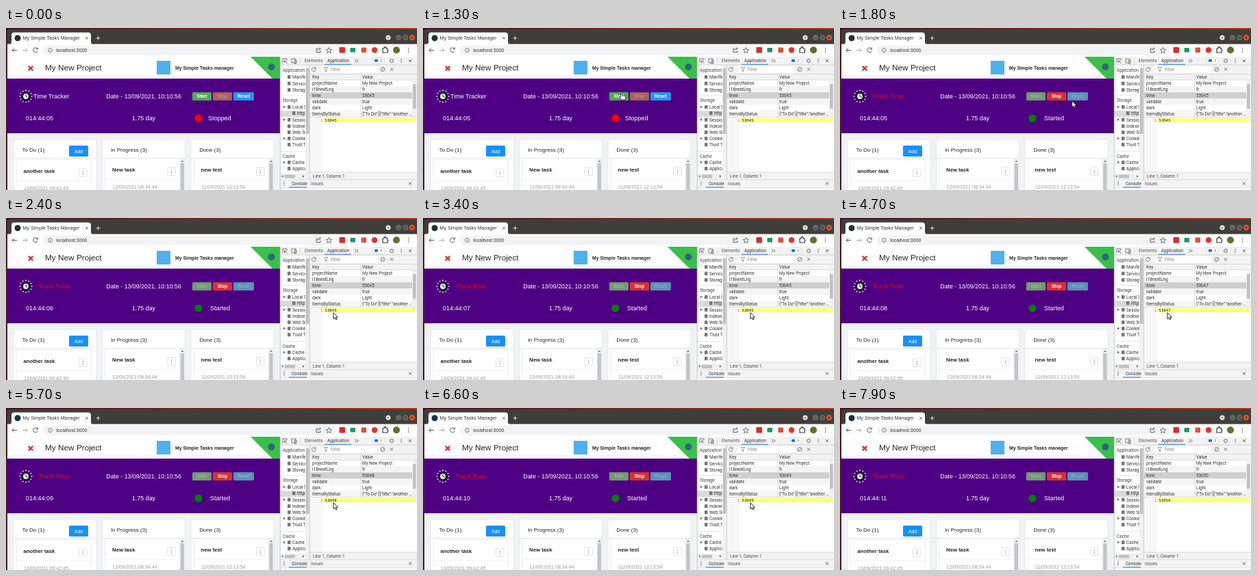
An HTML page that plays this animation: 600x237 px, repeating every 8 s.

```html
<!DOCTYPE html>
<html lang="en">
<head>
<meta charset="utf-8">
<title>Task board time tracker</title>
<style>
  html, body { margin: 0; width: 100%; height: 100%; overflow: hidden; background: #fff; }
  svg { display: block; width: 100vw; height: 100vh; }
  text { font-family: "Liberation Sans", Arial, sans-serif; white-space: pre; }
  .dev text { font-family: Roboto, "Open Sans", sans-serif; }
  .dev text.mono { font-family: "DejaVu Sans Mono", monospace; }
</style>
</head>
<body>
<svg id="stage" viewBox="0 0 600 237" preserveAspectRatio="none"></svg>
<script>
const LOOP = 8000, STEP = 100;
const STARTED = 1500, FIRST_TICK = 2300, FIRST_SAVE = 3500;
const BASE = 53045;

const rect = (x, y, w, h, fill, extra = '') =>
  `<rect x="${x}" y="${y}" width="${w}" height="${h}" fill="${fill}" ${extra}/>`;
const dot = (x, y, r, fill, extra = '') =>
  `<circle cx="${x}" cy="${y}" r="${r}" fill="${fill}" ${extra}/>`;
const line = (d, color, width = 1, extra = '') =>
  `<path d="${d}" fill="none" stroke="${color}" stroke-width="${width}" ${extra}/>`;
const text = (x, y, size, content, fill = '#222', extra = '') =>
  `<text x="${x}" y="${y}" font-size="${size}" fill="${fill}" ${extra}>${content}</text>`;
const dots = (x, y, gap, r, fill) => [-1, 0, 1].map(i => dot(x, y + i * gap, r, fill)).join('');
const cross = (x, y, r, color, width) =>
  line(`M${x - r} ${y - r}l${2 * r} ${2 * r}m0 ${-2 * r}l${-2 * r} ${2 * r}`, color, width);
const BOLD = 'font-weight="700"';
const MIDDLE = 'text-anchor="middle"';

function browser() {
  return '<linearGradient id="desk"><stop stop-color="#3a1020"/><stop offset="1" stop-color="#b03a1c"/></linearGradient>' +
    rect(0, 0, 600, 237, '#4a1a24') + rect(0, 0, 600, 3, 'url(#desk)') +
    rect(2, 1.8, 598, 22, '#403e3a', 'rx="2.5"') +
    `<path d="M5 24q3 0 3-4V10.500q0-4 4-4H120q4 0 4 4V20q0 4 3 4z" fill="#fff"/>` +
    dot(17, 14.8, 4.5, '#20303c') +
    text(24.6, 17.2, 7.1, 'My Simple Tasks Manager', '#333') +
    cross(118, 14.8, 1.8, '#555', 0.9) +
    line('M131.500 14.800h6m-3-3v6', '#ddd', 1) +
    dot(558, 14, 3.6, '#e4e4e2') + line('M556.500 13.300l1.500 1.600 1.500-1.600', '#333', 0.9) +
    dot(573, 14, 4, '#6a6963') + line('M571 15h4', '#333', 0.8) +
    dot(583.3, 14, 4, '#6a6963') + line('M581.800 12.500h3v3h-3z', '#333', 0.7) +
    dot(593, 14, 4.2, '#d9532c') + cross(593, 14, 1.5, '#42201a', 0.8) +
    rect(2, 23.5, 598, 18.5, '#fff') + '<g transform="translate(0 -1)">' +
    line('M16 33.500H9m3-3l-3 3 3 3', '#555', 1) +
    line('M24 33.500h7m-3-3l3 3-3 3', '#aaa', 1) +
    line('M46 31.500a3.400 3.400 0 1 0 .3 3M46.500 29.500v2.500h-2.500', '#555', 1) +
    rect(54, 26.5, 427, 14, '#f1f3f4', 'rx="7"') +
    dot(64.5, 33.5, 3, 'none', 'stroke="#666" stroke-width=".8"') + line('M64.500 33v2.300m0-3.800v.7', '#666', 0.7) +
    text(73.3, 36, 7, 'localhost:3000', '#333') +
    line('M455 31h-2v5.500h6V34M455 34q0-3 4-3m-1.500-1.500l1.800 1.500-1.800 1.500', '#555', 0.9) +
    line('M471.500 29.500l1.200 2.800 3 .2-2.300 2 .7 3-2.600-1.600-2.600 1.600.7-3-2.300-2 3-.2z', '#555', 0.8) +
    rect(486.5, 29, 8.5, 8.5, '#dc2b2b', 'rx="1"') +
    rect(502.5, 30, 7.5, 6.5, '#199a60', 'rx="1"') +
    rect(518.5, 29.5, 7.5, 7.5, '#e0503c', 'rx="1"') +
    dot(538, 33.3, 4.2, '#e03232') +
    line('M550 31h2v-1.500q1.500-1.500 3 0V31h2v2q2 1 0 2v2h-7z', '#333', 1.2) +
    dot(570, 33.3, 5, '#55742c') + dot(570, 34.5, 2.6, '#77653a') +
    dots(587.5, 33.3, 2.8, 0.8, '#555') + '</g>';
}

function header() {
  return rect(2, 42, 398, 32, '#fff') + line('M2 70h398', '#ececee', 1) +
    cross(36, 59, 3.2, '#dc3438', 2.4) +
    text(57, 62.2, 11.8, 'My New Project') +
    rect(220, 48, 20, 20, '#4db1ee') +
    text(247, 60.5, 6.9, 'My Simple Tasks manager', '#222', BOLD) +
    '<path d="M357 42H400V85z" fill="#38c048"/>' + dot(387.5, 57, 5, '#2d6585');
}

function button(id, x, w, label) {
  return `<g id="${id}">` + rect(x, 94, w, 12, '#fff', 'rx="1.6"') +
    text(x + w / 2, 102.3, 6.6, label, '#fff', `${BOLD} ${MIDDLE}`) + '</g>';
}

function clock() {
  const ring = Array.from({ length: 12 }, (_, i) => {
    const a = i * Math.PI / 6;
    return dot(29 + 8.6 * Math.sin(a), 100 - 8.6 * Math.cos(a), 1.05, '#e3d9b4');
  }).join('');
  return ring + dot(29, 100, 5.4, '#f4f4f4', 'stroke="#1b1c33" stroke-width="3"') +
    line('M29 97V100.300l2.500 .8', '#222', 1);
}

function tracker() {
  return rect(2, 74, 398, 80, '#4e0083') + clock() +
    text(40, 103, 9, 'Time Tracker', '#fff', 'id="heading"') +
    text(146.3, 103, 8.8, 'Date - 13/09/2021, 10:10:56', '#fff') +
    button('start', 272, 28, 'Start') +
    button('stop', 302, 28, 'Stop') +
    button('reset', 332, 30, 'Reset') +
    text(29, 135.3, 9, '', '#fff', 'id="elapsed"') +
    text(184, 135.3, 8.9, '1.75 day', '#fff') +
    dot(281, 132, 5.6, 'red', 'id="lamp"') +
    text(295, 135.3, 9, 'Stopped', '#fff', 'id="status"');
}

function column(x, title, task, date, scrolls) {
  const bar = rect(x + 113, 191, 8, 46, '#f1f1f1') + rect(x + 114.3, 198, 5.2, 39, '#c4c4c4') +
    `<path d="M${x + 115} 196l2-2.500 2 2.500z" fill="#777"/>`;
  const lift = scrolls ? -1.8 : 0;
  return rect(x, 163, 121, 80, '#fff', 'rx="2" stroke="#e2e4e8" stroke-width=".8"') +
    text(x + 12.4, 181, 8, title) +
    line(`M${x} 190.500h121`, '#e6e6e6', 1) +
    `<g transform="translate(0 ${lift})">` +
    line(`M${x + 4} 240V192.500h109V240`, '#e8e8e8', 0.8) +
    text(x + 14.6, 211.5, 7.7, task, '#222', BOLD) +
    rect(x + 95.5, 206, 11.5, 11.5, '#fff', 'rx="1.5" stroke="#d9d9d9" stroke-width=".8"') +
    dots(x + 101.2, 211.8, 2.2, 0.6, '#555') +
    line(`M${x + 4} 223.500h109`, '#eee', 0.8) +
    text(x + 15, 236.5, 7.1, date, '#999') + '</g>' + (scrolls ? bar : '');
}

function board() {
  return rect(2, 154, 398, 83, '#f0f2f5') +
    column(11, 'To Do (1)', 'another task', '13/09/2021 09:42:45', false) +
    rect(92, 172, 28, 16, '#1890ff', 'rx="1.5"') +
    text(106, 182.6, 7, 'Add', '#fff', MIDDLE) +
    column(140.5, 'In Progress (3)', 'New task', '12/09/2021 08:34:44', true) +
    column(270, 'Done (3)', 'new test', '11/09/2021 12:13:54', true);
}

function sidebar() {
  const items = [
    [64, 'Application'], [74, 'Manifest', 1], [83.5, 'Service W', 1], [93, 'Storage', 1],
    [108, 'Storage'], [118, 'Local Sto', 1], [127, 'http:', 2], [136.5, 'Session S', 1],
    [146, 'IndexedDB', 1], [155, 'Web SQL', 1], [164, 'Cookies', 1], [173, 'Trust Tok', 1],
    [189.5, 'Cache'], [199, 'Cache St', 1], [208, 'Applicati', 1]
  ];
  const folded = ['Local Sto', 'Session S', 'Cookies', 'Cache St'];
  return rect(400, 54, 43, 168, '#fff') + rect(400, 121, 40, 9, '#dadada') +
    items.map(([y, label, depth = 0]) =>
      (depth ? rect(404 + 7 * depth, y - 5, 4.5, 5.2, '#777', 'rx=".8"') : '') +
      (folded.includes(label) ? `<path d="M405 ${y - 4.500}l3 2-3 2z" fill="#666"/>` : '') +
      text(depth ? 411 + 7 * depth : 404, y, 6.4, label, depth ? '#333' : '#444')).join('') +
    line('M400 98.500h40M400 180.500h40', '#ddd', 0.7) +
    rect(437, 54, 7, 168, '#f1f1f1') + rect(438, 59, 4.5, 96, '#c1c1c1') +
    rect(400, 213, 37, 8, '#f1f1f1') + rect(407, 214.7, 15, 5, '#c1c1c1') +
    '<path d="M404.500 215v4l-2.300-2zM433 215v4l2.300-2z" fill="#666"/>';
}

function storage() {
  const rows = [
    ['projectName', 'My New Project'], ['i18nextLng', 'fr'], ['time', ''],
    ['validate', 'true'], ['dark', 'Light'], ['itemsByStatus', '{"To Do":[{"title":"another …']
  ];
  return rect(444, 54, 156, 13, '#f3f3f3') +
    line('M451 58a3 3 0 1 0 1.500 2.500M452 57v2.500h-2.500', '#666', 0.8) +
    rect(460, 55.5, 82, 10, '#fff') + text(474, 63, 6.4, 'Filter', '#888') +
    line('M464 57.500h6l-2.300 3v3h-1.400v-3z', '#777', 0.7) +
    dot(550, 60.5, 3, 'none', 'stroke="#666" stroke-width=".8"') + line('M548 62.500l4-4', '#666', 0.8) +
    cross(563, 60.5, 2.2, '#666', 0.9) +
    rect(444, 67, 156, 9, '#f3f3f3') +
    text(447, 74, 6.4, 'Key', '#333') + text(520, 74, 6.4, 'Value', '#333') +
    rows.map(([key, value], i) => {
      const y = 76 + i * 9.1;
      return rect(444, y, 149, 9.1, key === 'time' ? '#cfcfcf' : i % 2 ? '#f5f5f5' : '#fff') +
        text(447, y + 6.7, 6.4, key, '#333') +
        text(520, y + 6.7, 6.3, value, '#333', key === 'time' ? 'id="stored"' : '');
    }).join('') +
    line('M444 67.500h156M444 76h156M518 67v64M444 130.700h156', '#ccc', 0.7) +
    rect(593, 76, 7, 54, '#f1f1f1') + rect(594, 82, 4.5, 36, '#c1c1c1') +
    rect(444, 131, 156, 80, '#fff') + rect(444, 131, 18, 80, '#f7f7f7') +
    rect(462.5, 132, 136, 6, '#ffff79') +
    text(459, 136.8, 5.2, '1', '#777', 'class="mono"') +
    text(465.5, 136.9, 5.7, '', '#222', 'id="preview" class="mono"') +
    rect(444, 211, 156, 11, '#f3f3f3') + line('M444 211h156', '#ccc', 0.7) +
    text(448, 218.6, 6.3, 'Line 1, Column 1', '#444');
}

function devtools() {
  return '<g class="dev">' + rect(400, 42, 200, 195, '#f3f3f3') +
    line('M404 51v-6h6v2m-3.500 1l4 4m-4-4v3m0-3h3', '#666', 0.9) +
    line('M417 45h6v6h-6zM421 47h3v5h-3z', '#666', 0.8) + line('M429.500 44v8', '#ccc', 0.7) +
    text(436, 50.3, 6.4, 'Elements', '#555') +
    text(469, 50.3, 6.4, 'Application', '#333') + rect(465, 52.7, 39, 1.3, '#1a73e8') +
    line('M509 45.500l2.200 2.500-2.200 2.500m3-5l2.200 2.500-2.200 2.500', '#666', 0.9) +
    rect(535, 43.7, 17, 8.4, '#fff', 'rx="1" stroke="#ccc" stroke-width=".6"') +
    rect(538, 45.7, 5, 4, '#1a73e8') + text(546, 50.2, 6, '1', '#333') +
    dot(563, 48, 2.4, 'none', 'stroke="#666" stroke-width="1.5" stroke-dasharray="1.2 .7"') +
    dots(577, 48, 2.3, 0.7, '#555') + cross(590, 48, 2.1, '#555', 0.9) +
    sidebar() + storage() +
    line('M400 54h200M443.500 54v168M400 222h200', '#c8c8c8', 0.8) +
    rect(400, 222.4, 200, 14.6, '#f3f3f3') + dots(406, 227.5, 2.2, 0.7, '#555') +
    text(417, 229.5, 6.3, 'Console', '#333') + rect(413, 232.5, 26, 1.2, '#1a73e8') +
    text(445, 229.5, 6.3, 'Issues', '#555') + cross(590, 227.5, 2, '#555', 0.9) +
    line('M400 234h200', '#ccc', 0.7) + rect(400, 234.4, 200, 3, '#fafafa') +
    line('M400.300 42v195', '#bbb', 0.8) + '</g>';
}

const cursors =
  '<g id="pointer"><path id="arrow" d="M0-4.500V4.500l2.200-1.700 1.400 3 1.500-.7L3.700 2.200H6.500z" fill="#fff" stroke="#222" stroke-width="1"/>' +
  '<path id="hand" d="M-1.500-4.500q1.200-1 1.700.3l.7 3 3.800.7q1.300.4 1 2L5 5H0l-3-3.800q0-1.500 1.500-.7l.6.600z" fill="#fff" stroke="#222" stroke-width=".8"/>' +
  '<path id="beam" d="M-2-5q2 0 2 1V4q0 1-2 1M2-5q-2 0-2 1M2 5q-2 0-2-1" fill="none" stroke="#111" stroke-width="1"/></g>';

document.getElementById('stage').innerHTML =
  browser() + header() + tracker() + board() + devtools() + cursors;

const $ = id => document.getElementById(id);
const show = (id, visible) => $(id).setAttribute('display', visible ? 'inline' : 'none');
const path = [
  [0, 310, 260], [400, 310, 250], [1100, 290, 100], [1600, 290, 100],
  [2200, 478, 143], [7100, 478, 143], [7800, 60, 130], [LOOP, 60, 130]
];
const buttonColors = {
  start: { on: '#4cae50', off: '#6f9b70', offText: '#9dba92' },
  stop: { on: '#d6322e', off: '#a2645f', offText: '#c58f80' },
  reset: { on: '#2497f0', off: '#5b92b4', offText: '#86aec8' }
};

function enable(id, on) {
  const { on: active, off, offText } = buttonColors[id];
  const [box, label] = $(id).children;
  box.setAttribute('fill', on ? active : off);
  label.setAttribute('fill', on ? '#fff' : offText);
}

function pointerAt(t) {
  const i = path.findIndex(p => p[0] > t);
  const [t0, x0, y0] = path[i - 1], [t1, x1, y1] = path[i];
  const k = (t - t0) / (t1 - t0), ease = k * k * (3 - 2 * k);
  return [x0 + (x1 - x0) * ease, y0 + (y1 - y0) * ease];
}

const ticksSince = (t, first) => Math.max(0, Math.floor((t - first) / 1000) + 1);
const two = n => String(n).padStart(2, '0');
const clockText = s =>
  `${String(Math.floor(s / 3600)).padStart(3, '0')}:${two(Math.floor(s / 60) % 60)}:${two(s % 60)}`;

function render(t) {
  const running = t >= STARTED;
  $('heading').textContent = running ? 'Track Time' : 'Time Tracker';
  $('heading').setAttribute('x', running ? 48 : 40);
  $('heading').setAttribute('fill', running ? 'red' : '#fff');
  $('status').textContent = running ? 'Started' : 'Stopped';
  $('status').setAttribute('x', running ? 298 : 295);
  $('lamp').setAttribute('fill', running ? 'green' : 'red');
  enable('start', !running);
  enable('stop', running);
  enable('reset', !running);

  $('elapsed').textContent = clockText(BASE + ticksSince(t, FIRST_TICK));
  const saved = BASE + ticksSince(t, FIRST_SAVE);
  $('stored').textContent = $('preview').textContent = saved;

  const [x, y] = pointerAt(t);
  const onButton = x > 271 && x < 363 && y > 93 && y < 107;
  const onText = y > 126 && y < 137 && x > 28 && x < 70;
  $('pointer').setAttribute('transform', `translate(${x} ${y})`);
  show('hand', onButton);
  show('beam', onText);
  show('arrow', !onButton && !onText);
}

function frame(now) {
  render(Math.floor((now % LOOP) / STEP) * STEP);
  requestAnimationFrame(frame);
}
render(0);
requestAnimationFrame(frame);
</script>
</body>
</html>
```
